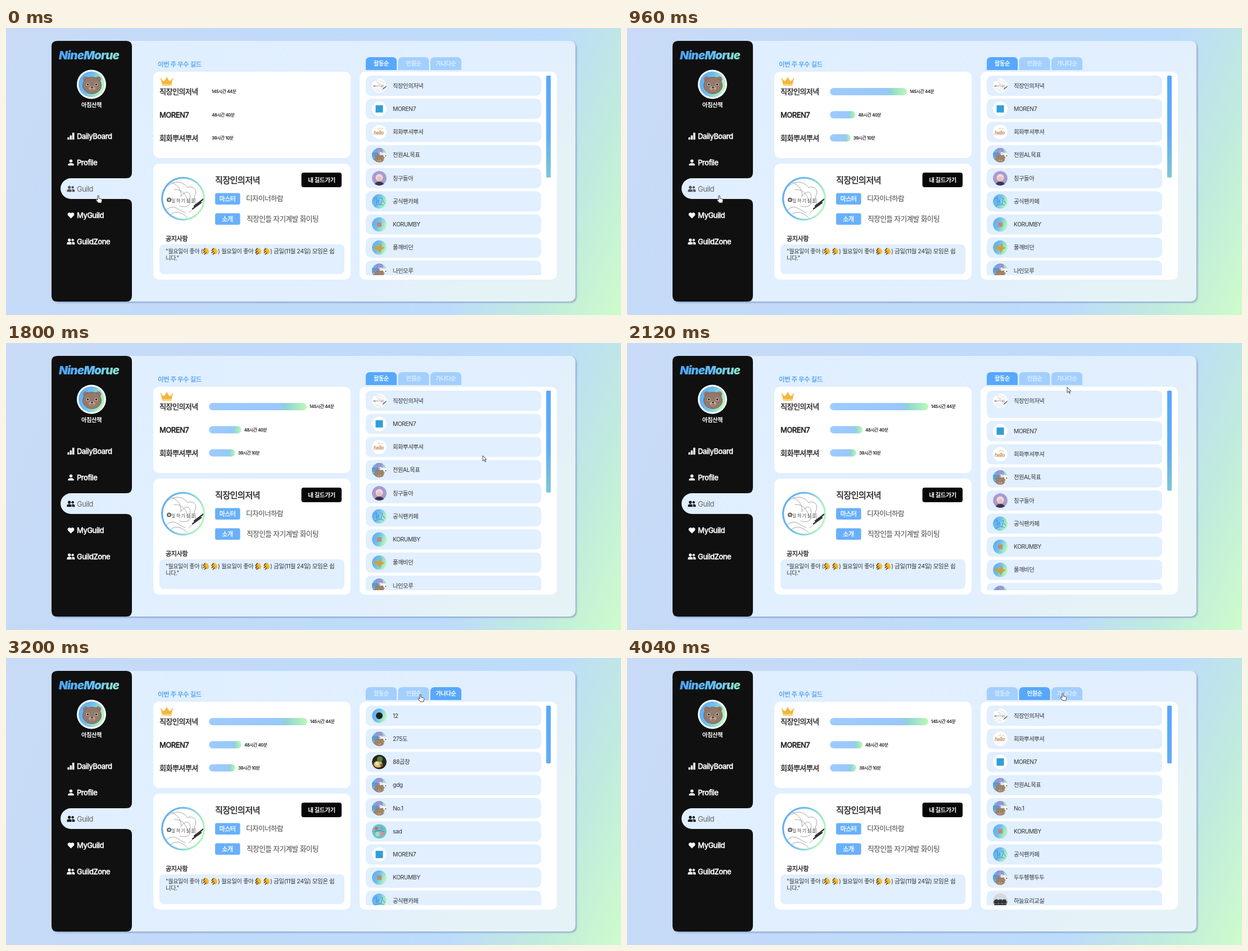
An HTML page that plays this animation: 1094 by 512 pixels, repeating every 4080 ms.

```html
<!DOCTYPE html>
<html lang="ko">
<head>
<meta charset="utf-8">
<title>Guild board</title>
<style>
html, body { margin: 0; width: 100%; height: 100%; overflow: hidden; background: #c3dbf8; }
svg { display: block; width: 100%; height: 100%; }
text { font-family: Inter, "Noto Sans CJK KR", "Noto Sans CJK", sans-serif; letter-spacing: -.04em; white-space: pre; }
</style>
</head>
<body>
<svg id="stage" viewBox="0 0 1094 512"></svg>
<script>
const CYCLE = 4080, PITCH = 41.25, VIEW = 356;
const stage = document.getElementById('stage');

// Weight 500 is thickened with a hairline, as the Korean font has no medium cut
const text = (x, y, s, size, fill = '#222', weight = 400, extra = '') =>
  `<text x="${x}" y="${y}" font-size="${size}" fill="${fill}" font-weight="${weight}" ${weight === 500 ?
    `stroke="${fill}" stroke-width="${size * .03}"` : ''} ${extra}>${s}</text>`;
const box = (x, y, w, h, r, fill, extra = '') =>
  `<rect x="${x}" y="${y}" width="${w}" height="${h}" rx="${r}" fill="${fill}" ${extra}/>`;
const disc = (x, y, r, fill, extra = '') => `<circle cx="${x}" cy="${y}" r="${r}" fill="${fill}" ${extra}/>`;
const line = (d, stroke, width = 1) =>
  `<path d="${d}" fill="none" stroke="${stroke}" stroke-width="${width}" stroke-linecap="round" stroke-linejoin="round"/>`;
const at = (x, y, s, inner) => `<g transform="translate(${x} ${y}) scale(${s})">${inner}</g>`;
const gradient = (id, stops, attrs = '') => `<linearGradient id="${id}" ${attrs}>` +
  stops.map(([o, c]) => `<stop offset="${o}" stop-color="${c}"/>`).join('') + '</linearGradient>';

const defs = `<defs>
${gradient('page', [[0, '#c9dbf6'], [.4, '#c1daf9'], [.76, '#bddcfb'], [.88, '#c0eadf'], [1, '#cdfccb']],
  'gradientUnits="userSpaceOnUse" x1="0" y1="0" x2="1123" y2="438"')}
${gradient('card', [[0, '#e0efff'], [.8, '#e1efff'], [1, '#e5f2f6']], 'x2="1" y2=".4"')}
${gradient('bar', [[0, '#9ecbff'], [.73, '#98c8fe'], [.78, '#8fd3d4'], [1, '#bbf9b6']])}
${gradient('aqua', [[0, '#5ba8f8'], [.5, '#70bdee'], [1, '#b0f5bd']], 'x2="1" y2=".35"')}
${gradient('logo', [[0, '#4ba3fb'], [.55, '#62bdf5'], [1, '#8ee6cd']])}
${gradient('scroll', [[0, '#58a8ff'], [.55, '#62adf4'], [1, '#80c8d4']],
  'gradientUnits="userSpaceOnUse" x1="0" y1="85" x2="0" y2="272"')}
<clipPath id="round"><circle r="13"/></clipPath>
<clipPath id="photo"><circle r="36"/></clipPath>
<clipPath id="list"><rect x="630" y="84" width="350" height="357"/></clipPath>
<filter id="shadow" x="-5%" y="-5%" width="110%" height="110%">
<feDropShadow dx="2" dy="2" stdDeviation="1.5" flood-color="#7f98c4" flood-opacity=".8"/></filter>
</defs>`;

// Small pictures, centred on the origin
const bear = (fur, muzzle) => disc(-12, -12, 5.5, fur) + disc(12, -12, 5.5, fur) +
  `<ellipse rx="18" ry="16" fill="${fur}" stroke="#5d4b40" stroke-width=".6"/>` +
  [-8, 8].map(x => disc(x, -2, 2.8, '#eee') + disc(x, -2, 2, '#222')).join('') +
  `<ellipse cy="6" rx="6" ry="4.5" fill="${muzzle}"/>` + disc(0, 4, 1.8, '#333') + line('M-3 8Q0 10 3 8', '#333');

const sketch = line('M-34-18C-16-34-2-32 8-20M-22-30C-8-24-2-14-4-4M8-20C20-24 27-14 20-3M-4-4C6-17 15-13 12 2' +
  'M-16-16C-5-18 6-9 8 4M-30 20C-16 8-10 20 4 25M-24 31C-16 19-2 24 8 34M12 2C17 12 4 17-6 13M20-3C27 8 18 20 10 25', '#999', .9) +
  line('M37 0L20 13M32 7L17 18', '#333', 2.4) + disc(-25, 2, 3.2, '#bbb', 'stroke="#333" stroke-width="1.3"') +
  text(-21, 6, '일 하 기 싫 을', 8, '#444', 400, 'style="font-family:\'Noto Serif\',\'Noto Sans CJK KR\',serif"');

const person = (shirt, hair, skin) => disc(0, -1, 6.5, hair) + disc(0, 1, 4, skin) +
  `<path d="M-9 14Q-8 6 0 6T9 14Z" fill="${shirt}"/>`;

const pictures = {
  sketch: disc(0, 0, 13, '#fff') + at(0, 0, .36, sketch),
  badge: disc(0, 0, 13, '#fff') + box(-6.5, -6.5, 13, 13, 0, '#2f9fd8'),
  hello: disc(0, 0, 13, '#fff') + line('M-2-6L1-7M4-6L6-6', '#e7b96a', 1.2) +
    text(-10, 4, 'hello', 8.5, '#c7905f', 500, 'font-style="italic"'),
  bears: disc(0, 0, 13, 'url(#aqua)') + at(0, -7, .33, bear('#a393d8', '#d8d0f2')) +
    at(8, 2, .43, bear('#f4f4f6', '#ddd')) + at(-8, 2, .4, bear('#5d9bd6', '#a9ceee')) + at(0, 7, .43, bear('#a58263', '#d6b898')),
  lady: disc(0, 0, 13, '#a89ad0') + person('#3d3550', '#f1d9d8', '#eebfb7'),
  waves: disc(0, 0, 13, 'url(#aqua)') + line('M-9-4L-5-7V4L-1-3V4M2-6L6-5L3 5M7-1L10 4M-8 8Q0 3 8 7', '#3d87d4', .9),
  orange: disc(0, 0, 13, 'url(#aqua)') + box(-4, -4, 8, 8, 0, '#b88f72'),
  bird: disc(0, 0, 13, 'url(#aqua)') + '<path d="M-10-3L-1-2L3-9L5-1L10 0L4 4L1 10L-3 4L-9 2Z" fill="#c9a33f"/>',
  dark: disc(0, 0, 13, 'url(#aqua)') + disc(0, 0, 6, '#222'),
  food: disc(0, 0, 13, '#27261f') + '<ellipse cx="-2" cy="4" rx="8" ry="6" fill="#d7bd72"/>' +
    disc(1, -5, 5, '#53823e') + disc(-4, 3, 3, '#efe0a4') + disc(4, 5, 2.5, '#8a5c30'),
  hearts: disc(0, 0, 13, '#68c5c4') + disc(-5, -5, 3, '#d95f76') + disc(4, -5, 3.5, '#7fa8d2') +
    disc(-3, 5, 4, '#a7d8cf') + disc(5, 4, 3.6, '#d98b9c') + line('M-9 1Q0-4 9 1', '#457f8a'),
  group: disc(0, 0, 13, '#d5d8dc') + box(-13, 1, 26, 13, 0, '#777b80') +
    [-7, 0, 7].map(x => at(x, 2, .6, person('#30343a', '#30343a', '#30343a'))).join('')
};
const avatar = kind => `<g clip-path="url(#round)">${pictures[kind]}</g>`;

const people = disc(-3, -3, 2.7, 'currentColor') + disc(3.3, -3, 2.3, 'currentColor') +
  '<path d="M-7.5 5.5V3Q-7 .5-3 .5T1.2 3V5.5ZM2.4 5.5V3L1.6.7Q7.2 0 7.2 3.4V5.5Z" fill="currentColor"/>';
const icons = {
  chart: box(-6.5, 2, 3.5, 4.5, .8, '#fff') + box(-2, -1.5, 3.5, 8, .8, '#fff') + box(2.5, -6.5, 3.8, 13, .8, '#fff'),
  user: disc(0, -2.8, 2.9, '#fff') + '<path d="M-5.5 5.5V4Q-5 1 0 1T5.5 4V5.5Z" fill="#fff"/>',
  heart: '<path d="M0 6L-5.5 .5C-8-3-3-7.5 0-3.5C3-7.5 8-3 5.5.5Z" fill="#fff"/>',
  people
};
const menu = [['DailyBoard', 'chart', 193], ['Profile', 'user', 240], ['Guild', 'people', 287], ['MyGuild', 'heart', 334], ['GuildZone', 'people', 381]]
  .map(([name, icon, y]) => {
    const active = name === 'Guild';
    return `<g ${active ? 'id="guild"' : ''} color="#fff">${at(115.5, y, .95, icons[icon])}` +
      text(126, y + 4.6, name, 13, active ? '#666' : '#fff', active ? 400 : 500) + '</g>';
  }).join('');

const sidebar = `<path fill="#101010" d="M91 23H214Q224 23 224 33V258Q224 268 214 268H115.5A18.5 18.5 0 0 0 115.5 305H214
  Q224 305 224 315V478Q224 488 214 488H91Q81 488 81 478V33Q81 23 91 23Z"/>` +
  text(94, 55.5, 'NineMorue', 20.5, 'url(#logo)', 900, 'font-style="italic"') +
  disc(152, 100.5, 26, '#fff') + disc(152, 100.5, 23, 'url(#aqua)') + at(153, 102.5, .93, bear('#95796a', '#c4a994')) +
  text(152, 141, '아침산책', 10.3, '#fff', 700, 'text-anchor="middle"') + menu;

const clap = x => at(x, 398, 1, '<ellipse rx="4.6" ry="5.8" transform="rotate(-30)" fill="#f5b731"/>' +
  line('M-5-1L-2-5M-5 3L-2 0M-3 6L0 3', '#5d431f', 1.5));
const crown = '<path d="M275.5 91L281 95L286 88L291 95L296.5 91L294 103H278Z" fill="#f4b63c"/>' +
  disc(276, 91, 1.5, '#f7c95e') + disc(286, 89, 1.6, '#f7c95e') + disc(296, 91, 1.5, '#f7c95e') +
  box(278, 100, 16, 2.5, 0, '#fbd77c');

const ranking = [['직장인의저녁', '145시간 44분', 175], ['MOREN7', '48시간 40분', 58], ['회화뿌셔뿌셔', '39시간 10분', 47]];
const rankPanel = text(270, 69, '이번 주 우수 길드', 11.5, '#5ba8f5', 700) + box(262, 78, 351, 154, 10, '#fff') + crown +
  ranking.map(([name, time], i) => {
    const y = 113.5 + PITCH * i;
    return text(273, y + 4.8, name, 13, '#222', 500) + box(361, y - 6.5, 0, 13, 6.5, 'url(#bar)', 'class="bar"') +
      text(366, y + 2.8, time, 7.7, '#222', 500, 'class="time"');
  }).join('');

const tag = (y, label) => box(372, y, 44.5, 20.5, 3, '#68b0fb') +
  text(394, y + 14.3, label, 11, '#fff', 500, 'text-anchor="middle"');
const detail = box(262, 242, 351, 207, 10, '#fff') +
  disc(315, 304.5, 39, 'url(#aqua)') + `<g transform="translate(315 304.5)" clip-path="url(#photo)">${disc(0, 0, 36, '#fff')}${sketch}</g>` +
  text(372, 276.5, '직장인의저녁', 15.1, '#222', 500) +
  box(525.5, 258, 71.5, 26, 4, '#070707') + text(561.5, 275, '내 길드가기', 10.6, '#fff', 700, 'text-anchor="middle"') +
  tag(294.5, '마스터') + text(427, 309.3, '디자이너하람', 12.5, '#444') +
  tag(330.5, '소개') + text(428, 345.2, '직장인들 자기계발 화이팅', 12.6, '#444') +
  text(284, 380, '공지사항', 11.1, '#222', 500) + box(273, 386, 329, 53, 8, '#e1efff') +
  text(284, 402, '"월요일이 좋아 (', 10.1, '#333') + clap(356) + clap(371) +
  text(377, 402, ') 월요일이 좋아 (', 10.4, '#333') + clap(449) + clap(464) +
  text(470, 402, ') 금일(11월 24일) 모임은 쉽', 10.5, '#333') + text(284, 414, '니다."', 10.2, '#333');

const tabNames = ['활동순', '인원순', '가나다순'];
const tabs = tabNames.map((name, i) => {
  const x = 640 + 57.5 * i;
  const shape = `M${x} 75V60Q${x} 52 ${x + 8} 52H${x + 47}Q${x + 55} 52 ${x + 55} 60V75Z`;
  return `<path d="${shape}" fill="#a2cffe"/><path class="tab" d="${shape}" fill="#57a8fc"/>` +
    text(x + 27.5, 66.6, name, 10.2, '#fff', 700, 'text-anchor="middle" class="tabname"');
}).join('');

const evening = ['직장인의저녁', 'sketch'], team = ['MOREN7', 'badge'], talk = ['회화뿌셔뿌셔', 'hello'],
  level = ['전원AL목표', 'bears'], fan = ['공식팬카페', 'waves'], meet = ['KORUMBY', 'orange'], first = ['No.1', 'bears'];
const lists = [
  [evening, team, talk, level, ['칭구들아', 'lady'], fan, meet, ['풀깨비던', 'bird'], ['나인모루', 'bears']],
  [evening, talk, team, level, first, meet, fan, ['두두펭펭두두', 'bears'], ['하늘요리교실', 'group']],
  [['12', 'dark'], ['275도', 'bears'], ['88곱창', 'food'], ['gdg', 'bears'], first, ['sad', 'hearts'], team, meet, fan]
];
const rowCounts = [17, 30, 30];
const listPanel = box(629, 78, 351, 371, 10, '#fff') + '<g clip-path="url(#list)">' +
  lists.map(rows => '<g class="list">' + rows.map(([name, kind], i) =>
    `<g class="row" transform="translate(640 ${85 + PITCH * i})">${box(0, 0, 312, 36, 9, '#e1efff')}` +
    at(24, 18, 1, avatar(kind)) + text(48, 21.7, name, 10.3, '#333') + '</g>').join('') + '</g>').join('') +
  '</g>' + box(961, 85, 8, 182, 1.5, 'url(#scroll)', 'id="thumb"');

const cursor = `<g id="cursor" fill="#fff" stroke="#333" stroke-width=".9" stroke-linejoin="round">
  <path id="hand" d="M0 1C0-.8 2.2-.8 2.2 1V5L6 6C7.4 6.3 7.8 7 7.6 8.4L6.8 13H1.2L-2.6 8.3C-3.4 7.2-2 6.1-1 7L0 8Z"/>
  <path id="arrow" d="M0 0V9.5L2.3 7.4L4 11L5.4 10.4L3.8 6.9H6.7Z"/></g>`;

stage.innerHTML = defs + box(0, 0, 1094, 512, 0, 'url(#page)') +
  box(81, 23, 932, 465, 10, 'url(#card)', 'filter="url(#shadow)"') +
  sidebar + rankPanel + detail + tabs + listPanel + cursor;

const all = selector => [...stage.querySelectorAll(selector)];
const byId = id => document.getElementById(id);
const bars = all('.bar'), times = all('.time'), tabFills = all('.tab'), tabLabels = all('.tabname'),
  listGroups = all('.list'), firstRows = all('.list:first-child .row');

const clamp = v => Math.max(0, Math.min(1, v));
const smooth = v => (v = clamp(v), v * v * (3 - 2 * v));
// CSS "ease": cubic-bezier(.25, .1, .25, 1)
function ease(x) {
  let lo = 0, hi = 1;
  for (let i = 0; i < 24; i++) {
    const s = (lo + hi) / 2;
    if (.75 * s * (1 - s) + s ** 3 < x) lo = s; else hi = s;
  }
  return .3 * lo * (1 - lo) ** 2 + 3 * lo * lo * (1 - lo) + lo ** 3;
}
const swell = (t, start, peak, end, size) =>
  size * smooth(t < peak ? (t - start) / (peak - start) : (end - t) / (end - peak));

const path = [[0, 163, 299], [1090, 163, 299], [1560, 891, 281], [2120, 783, 79], [2350, 799, 62],
  [2720, 799, 62], [3150, 736, 65], [3600, 736, 65], [4040, 774, 63], [4080, 774, 63]];
function pointer(t) {
  const i = Math.max(1, path.findIndex(p => p[0] > t));
  const [t0, x0, y0] = path[i - 1], [t1, x1, y1] = path[i], k = smooth((t - t0) / (t1 - t0));
  return [x0 + (x1 - x0) * k, y0 + (y1 - y0) * k];
}

const clicks = [[0, 0], [2430, 2], [3320, 1]]; // time, selected tab

function draw(t) {
  const grow = ease(clamp(t / 2000));
  ranking.forEach(([, , width], i) => {
    bars[i].setAttribute('width', width * grow);
    times[i].setAttribute('x', 366 + width * grow);
  });

  const step = clicks.filter(c => c[0] <= t).length - 1;
  const [since, selected] = clicks[step], previous = step ? clicks[step - 1][1] : -1;
  const fade = step ? ease(clamp((t - since) / 300)) : 1;
  tabFills.forEach((tab, i) => {
    const strength = i === selected ? fade : i === previous ? 1 - fade : 0;
    tab.setAttribute('opacity', strength);
    tabLabels[i].setAttribute('opacity', .65 + .35 * strength);
  });
  listGroups.forEach((g, i) => g.setAttribute('display', i === selected ? 'inline' : 'none'));

  let offset = 0;
  firstRows.forEach((row, i) => {
    const extra = i === 0 ? swell(t, 2050, 2130, 2270, 13.5) : i === 4 ? swell(t, 1535, 1640, 1790, 8) : 0;
    row.setAttribute('transform', `translate(640 ${85 + PITCH * i + offset})`);
    row.firstChild.setAttribute('height', 36 + extra);
    offset += extra;
  });
  const content = rowCounts[selected] * 41 + (selected ? 0 : offset);
  byId('thumb').setAttribute('height', VIEW * VIEW / content);

  const [x, y] = pointer(t);
  const onGuild = x < 224 && y > 268 && y < 305, onTab = x > 640 && x < 810 && y > 52 && y < 75;
  byId('cursor').setAttribute('transform', `translate(${x} ${y})`);
  byId('hand').setAttribute('display', onGuild || onTab ? 'inline' : 'none');
  byId('arrow').setAttribute('display', onGuild || onTab ? 'none' : 'inline');
  byId('guild').setAttribute('color', onGuild ? '#555' : '#111');
}

function tick() {
  draw(performance.now() % CYCLE);
  requestAnimationFrame(tick);
}
tick();
</script>
</body>
</html>
```
